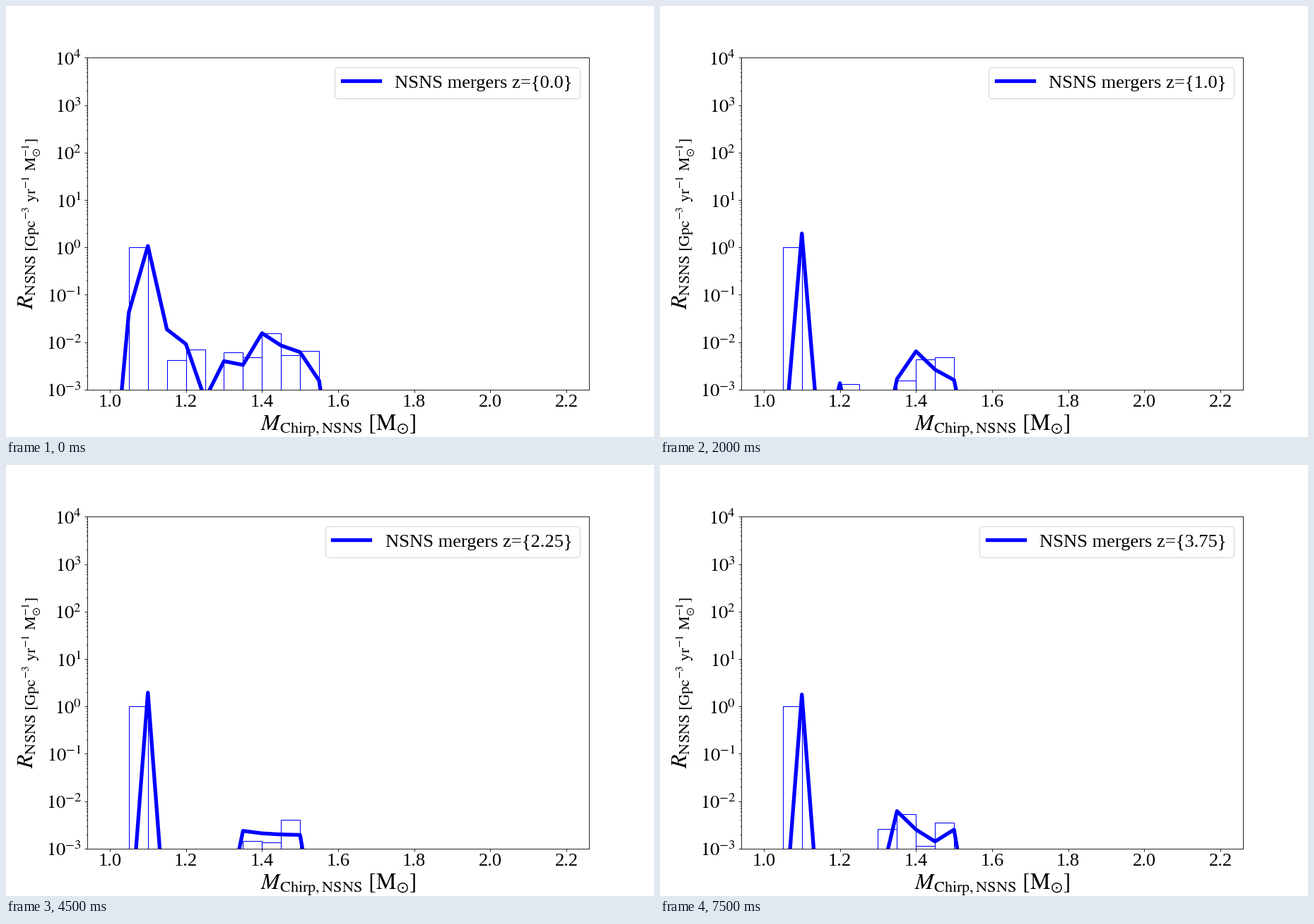
These frames come from a looping animation (917 by 611 pixels, 8000 ms). A matplotlib script:

```python
import numpy as np
import matplotlib.pyplot as plt
from matplotlib.animation import FuncAnimation
from matplotlib.ticker import LogLocator, NullFormatter

W, H = 917, 611
DPI = H / 8
FRAMES, INTERVAL = 16, 500
DZ, Z_MAX, BIN = 0.25, 3.75, 0.05
FLOOR = 1e-9

plt.rcParams.update({
    "font.family": "Liberation Serif",
    "mathtext.fontset": "stix",
    "font.size": 25,
})

# log10 rates at z = 0, one per mass bin
LINE_START = [-5.77, -1.37, 0.03, -1.73, -2.04, -3.2, -2.4,
              -2.48, -1.81, -2.07, -2.21, -2.81, -5.55]
BAR_START = [0, -5, -2.38, -2.16, -5, -2.21, -2.32, -1.81, -2.27, -2.18]

# mass: log10 trend at z = 0 and at Z_MAX, redshift scale on which it takes over
FADED = (-5, -5, 0.8)
LINE_TREND = {
    1.10: (0.35, 0.25, 0.75),
    1.20: (-2.1, -5, 0.8),
    1.30: (-5.6, -3.9, 0.8),
    1.35: (-3.25, -2.21, 0.9),
    1.40: (-2.8, -2.6, 1.2),
    1.45: (-2.48, -2.85, 0.5),
    1.50: (-2.88, -2.6, 0.6),
}
BAR_TREND = {
    1.05: (0, 0, 1),
    1.20: (-2.1, -5, 0.8),
    1.30: (-4.1, -2.58, 0.88),
    1.35: (-3.7, -2.27, 1.0),
    1.40: (-2.75, -2.95, 1.1),
    1.45: (-2.28, -2.46, 1),
    1.50: (-4, -4, 0.97),
}


def mass_grid(first, start):
    return np.round(first + BIN * np.arange(len(start)), 2)


def rates(z, masses, start, trend):
    """Each bin leaves its z = 0 value and settles on a straight log trend."""
    a, b, scale = np.array([trend.get(m, FADED) for m in masses]).T
    log_rate = a + (b - a) * z / Z_MAX + (start - a) * np.exp(-(z / scale) ** 3)
    return 10 ** log_rate


def label(z):
    return f"NSNS mergers z={{{z}}}"


line_masses = mass_grid(1.00, LINE_START)
bar_masses = mass_grid(1.05, BAR_START)

fig, ax = plt.subplots(figsize=(W / DPI + 1e-9, H / DPI), dpi=DPI)
bars = ax.bar(bar_masses, np.ones(len(bar_masses)), width=BIN, bottom=FLOOR,
              align="edge", fill=False, edgecolor="blue", linewidth=1)
line, = ax.plot(line_masses, np.ones(len(line_masses)), color="blue", lw=5,
                label=label(0.0))

ax.set_yscale("log")
ax.set_xlim(0.94, 2.26)
ax.set_ylim(1e-3, 1e4)
powers = np.arange(-3, 5)
ax.set_xticks(np.arange(1.0, 2.3, 0.2))
ax.set_yticks(10.0 ** powers, [f"$10^{{{p}}}$" for p in powers])
ax.yaxis.set_minor_locator(LogLocator(subs=range(2, 10), numticks=20))
ax.yaxis.set_minor_formatter(NullFormatter())
ax.set_xlabel(r"$M_{\mathrm{Chirp,NSNS}}\ [\mathrm{M}_{\odot}]$", fontsize=30)
ax.set_ylabel(r"$R_{\mathrm{NSNS\ [Gpc^{-3}\ yr^{-1}\ M_{\odot}^{-1}]}}$", fontsize=30)
legend_text = ax.legend(loc="upper right").get_texts()[0]


def update(i):
    z = DZ * i
    line.set_ydata(rates(z, line_masses, LINE_START, LINE_TREND))
    for bar, top in zip(bars, rates(z, bar_masses, BAR_START, BAR_TREND)):
        bar.set_height(top - FLOOR)
    legend_text.set_text(label(z))
    return [line, *bars, legend_text]


anim = FuncAnimation(fig, update, frames=FRAMES, interval=INTERVAL, repeat=True)
plt.show()
```
